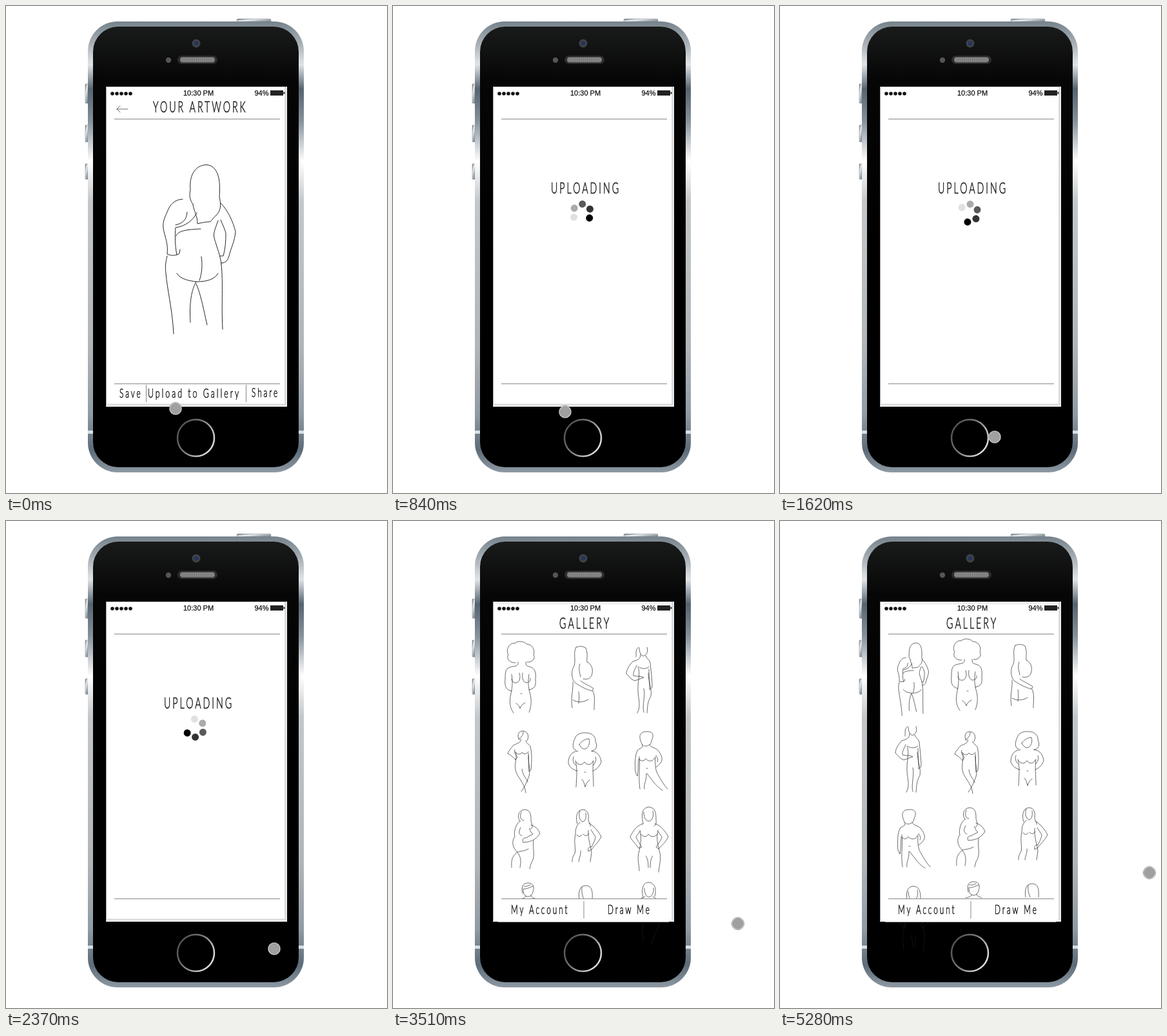
Recreate the animation shown at these times as an HTML page. Size 591x756 px, loop 6060 ms.

```html
<!DOCTYPE html>
<html lang="en">
<head>
<meta charset="utf-8">
<title>Gallery upload</title>
<style>
html, body { margin: 0; width: 100%; height: 100%; overflow: hidden; background: #fff; }
svg { display: block; width: 591px; height: 756px; }
.line { fill: none; stroke: #1c1c1c; stroke-width: .65; stroke-linecap: round; }
.line path { vector-effect: non-scaling-stroke; }
#portrait { stroke-width: .95; }
.rule { stroke: #888; }
.status { font: 11px "Liberation Sans", Arial, sans-serif; fill: #111; stroke: #111; stroke-width: .25; }
.label { font: 300 19px Lato, "Open Sans", sans-serif; letter-spacing: 4.8px; fill: #111; stroke: #111; stroke-width: .55; }
.title { font-size: 23px; }
.wide { font-size: 20px; }
</style>
</head>
<body>
<svg viewBox="0 0 591 756">
  <defs>
    <linearGradient id="steel" x2="0" y2="1">
      <stop offset="0" stop-color="#75828b"/>
      <stop offset=".05" stop-color="#a9b1b7"/>
      <stop offset=".095" stop-color="#e2e5e8"/>
      <stop offset=".15" stop-color="#566470"/>
      <stop offset=".22" stop-color="#84909a"/>
      <stop offset=".31" stop-color="#fff"/>
      <stop offset=".4" stop-color="#c3c7ca"/>
      <stop offset=".72" stop-color="#b0b5b9"/>
      <stop offset=".87" stop-color="#919ba3"/>
      <stop offset=".95" stop-color="#5d6c79"/>
      <stop offset="1" stop-color="#8d99a3"/>
    </linearGradient>
    <linearGradient id="glass" x2="0" y2="1">
      <stop offset="0" stop-color="#191b1a"/>
      <stop offset=".12" stop-color="#060606"/>
      <stop offset=".5" stop-color="#000"/>
    </linearGradient>
    <linearGradient id="key" y2="1">
      <stop offset="0" stop-color="#5d6a74"/>
      <stop offset=".3" stop-color="#eef0f1"/>
      <stop offset=".6" stop-color="#9aa4ab"/>
      <stop offset="1" stop-color="#56636d"/>
    </linearGradient>
    <linearGradient id="ring" x2="1" y2=".6">
      <stop offset="0" stop-color="#444"/>
      <stop offset=".5" stop-color="#777"/>
      <stop offset="1" stop-color="#ddd"/>
    </linearGradient>
    <pattern id="mesh" width="3" height="3" patternUnits="userSpaceOnUse">
      <path d="M0 0h3v3h-3z" fill="#8b8b8b"/><circle cx="1.5" cy="1.5" r=".8" fill="#5a5a5a"/>
    </pattern>
  </defs>

  <g fill="url(#key)" stroke="#6d7982" stroke-width=".5">
    <rect x="358" y="20" width="53" height="7" rx="2"/>
    <rect x="123" y="121" width="6" height="30" rx="1"/>
    <rect x="123" y="185" width="6" height="26" rx="1"/>
    <rect x="123" y="245" width="6" height="24" rx="1"/>
  </g>
  <rect x="127" y="24" width="335" height="700" rx="46" fill="url(#steel)"/>
  <path d="M127 84h8v5h-8zM454 84h8v5h-8zM127 659h8v5h-8zM454 659h8v5h-8z" fill="#d9dee1"/>
  <rect x="135" y="32" width="319" height="684" rx="39" fill="url(#glass)"/>
  <circle cx="295" cy="58" r="6.5" fill="#414345"/>
  <circle cx="295" cy="58" r="3.5" fill="#26345c"/>
  <circle cx="252" cy="84" r="4.2" fill="#555"/>
  <rect x="266" y="77" width="62" height="13" rx="6.5" fill="#2c2c2c"/>
  <rect x="270" y="79.5" width="54" height="8" rx="4" fill="url(#mesh)"/>
  <circle cx="294.5" cy="670.5" r="28.5" fill="#000" stroke="url(#ring)" stroke-width="2.5"/>

  <rect x="155" y="125" width="281" height="497" fill="#fff"/>
  <path d="M156 125.5H435M155.5 125V621" stroke="#aaa" fill="none"/>
  <path d="M433.5 126V619H157" stroke="#dcdcdc" stroke-width="3" fill="none"/>

  <g id="art">
    <path d="M189 160H172m5-5l-5 5 5 5" class="line"/>
    <g id="portrait" class="line"></g>
    <path class="rule" d="M217.5 588V615M372.5 588V615"/>
  </g>
  <g id="load"><g id="spin"></g></g>
  <g id="gallery">
    <path d="M160 128.5H432" stroke="#ddd"/>
    <g id="before" class="line"></g>
    <g id="after" class="line"></g>
    <path d="M157 587H432V622H157z" fill="#fff"/>
    <path class="rule" d="M296 590V617"/>
    <path d="M163 622.5H428" stroke="#999"/>
  </g>
  <path class="rule" d="M168 175.5H425M168 586.5H425"/>
  <g id="dots" fill="#111"></g>
  <text class="status" x="275" y="139">10:30 PM</text>
  <text class="status" x="385.5" y="139">94%</text>
  <path d="M410 131h20v8h-20zM430.500 133.500h2v3h-2z" fill="#222"/>

  <g id="cursor">
    <circle r="9.600" fill="#fff" stroke="#777" stroke-width=".8"/>
    <circle r="8.200" fill="#a0a0a0" stroke="#777" stroke-width=".6"/>
  </g>
</svg>
<script>
const $ = id => document.getElementById(id);
const add = (parent, html) => parent.insertAdjacentHTML('beforeend', html);

// Each sketch: first-layout path, then its shift to the second layout.
const sketches = [
  ['M190 220C181 221 175 213 179 207C174 200 181 188 189 190C194 185 204 187 207 191C216 191 221 201 218 207C222 214 215 220 208 219M194 219C195 224 192 225 185 226C175 228 174 232 174 245C173 255 174 262 184 264M206 219C206 224 207 225 211 226C221 228 222 236 221 246C222 256 220 260 211 262M184 238C186 250 185 258 183 268C180 280 181 290 187 298M211 238C209 250 210 258 212 266C216 278 214 290 211 297M196 236c2 6 1 13-4 15c-5 1-8-2-8-6M201 236c-1 6 0 13 5 15c5 0 8-3 7-7M191 283c3 2 5 4 6 8c1-4 4-7 8-9M198 268h2', 92, -4],
  ['M284 196C279 205 284 215 281 225C274 236 279 250 284 252C292 258 302 262 309 264L311 260C304 255 295 252 291 248M284 196C289 194 294 194 299 197C303 207 300 213 301 219C309 222 311 232 308 240C305 246 300 246 295 245M279 250C280 262 275 275 278 290M310 264C314 272 312 282 312 293M279 278C286 282 295 282 303 277M288 265c1 6 1 12 0 18M290 222c-3 8 0 14 1 20', 81, -3],
  ['M381 196C375 200 378 206 377 211M382 197C382 206 386 211 390 209C394 207 396 202 394 196M384 207C384 214 380 216 372 218C366 224 362 232 362 237C366 242 370 246 375 248L389 243C384 240 378 242 373 240C372 234 377 228 378 224M392 209C393 214 398 215 399 220C400 232 402 245 402 258L398 262C398 250 397 240 397 230M380 226C384 236 380 248 380 258C379 275 386 285 379 298M396 236C396 250 402 260 400 272C394 282 395 290 394 298M389 260C392 272 386 285 389 297M382 227c4 3 12 3 15-1', -183, 123],
  ['M196 340C192 334 194 326 201 326C209 326 212 334 208 341M202 327c0 6-3 9-7 11M198 338C200 344 193 345 187 348C181 355 179 358 178 361C184 364 188 368 190 371L193 366C190 362 187 359 189 355M206 341C206 345 211 346 213 350C216 362 215 375 214 386L211 389C210 380 211 368 210 360M190 358C193 366 188 378 190 386C192 398 204 405 206 422M210 364C209 375 214 385 211 396C207 406 204 414 199 420M190 359c3 4 8 4 10 0c3 4 8 3 10-1M200 385C201 396 208 400 209 405', 93, 1],
  ['M284 356C276 354 280 342 282 338C284 330 294 328 299 329C309 328 315 336 314 342C318 350 315 356 308 357M289 347C292 352 294 354 298 354C304 352 306 344 304 338C298 338 292 342 289 347M287 357C276 358 272 366 272 376C275 384 280 386 286 388M308 357C318 358 322 366 323 374C320 382 315 386 310 388M283 372C286 384 285 395 284 413M311 372C309 384 311 396 311 412M284 374c4 6 10 5 13 0c4 6 11 5 13-1M293 401c3 3 4 7 5 12c1-4 3-8 7-11M297 390h2M280 366c-2 5 0 10 3 13M314 366c2 5 0 9-3 13', 86, -2],
  ['M387 348C380 335 382 327 393 327C404 326 405 333 401 341C400 349 394 350 389 349M387 347C388 352 384 353 380 355C375 362 375 378 376 390L379 396C381 385 380 376 381 370M398 347C400 352 408 352 411 356C416 362 418 368 417 372C414 378 411 380 408 382M408 364c2 4 4 6 2 10M382 366C384 380 380 395 383 416M407 366C406 380 408 388 410 392C416 402 420 410 426 416M393 392C394 402 388 410 390 416M394 392C402 402 408 412 418 418M381 369c4 5 9 4 11 0c4 5 11 5 14-1M393 384h2', -193, 121],
  ['M197 466C192 460 194 449 204 448C214 448 214 458 214 464C214 470 219 474 214 478M199 452C196 460 198 464 203 465M197 466C190 470 187 484 189 490C183 498 186 508 193 514C182 522 184 532 184 538M214 472C222 474 226 480 228 485C222 494 216 498 202 499C200 495 202 491 206 492L217 486C214 484 212 480 212 477M218 496C216 510 222 520 214 532L212 540M193 514C200 512 206 512 210 509M198 476c-3 6-4 10 2 13M193 515C200 522 198 532 197 538', 90, -3],
  ['M286 470C283 462 284 449 294 448C303 448 304 458 303 463C303 468 307 470 306 474M290 450c-3 8 0 15 4 17c5-1 6-8 5-14M290 468C284 472 283 480 283 486C280 500 284 508 282 516C278 522 278 526 278 529M304 469C313 474 320 484 323 490C318 500 312 504 308 510L303 513C302 508 304 505 308 506C311 500 314 494 314 490C311 486 309 482 307 479M303 480C302 492 306 502 308 515L306 529M291 512C292 518 288 524 288 529M285 487c3 4 6 3 8 0M295 486c3 4 7 3 9-1', 92, -3],
  ['M388 470C386 460 384 446 396 444C408 444 408 456 408 464C409 470 407 472 405 474M389 452c0 10 4 14 8 14c6-1 8-10 6-16M388 470C378 472 372 482 368 490C370 496 376 500 381 508L386 506C382 500 378 494 377 490L383 482M406 470C416 472 422 482 427 490C424 498 418 502 412 509L408 506C412 500 417 494 417 490L411 482M383 480C386 492 384 500 382 512C378 524 382 534 382 543M411 480C408 494 411 502 413 512C417 522 413 534 412 545M384 486c4 5 10 5 12 0c4 5 11 5 14 0M392 520c3 3 4 10 4 18M403 520c-3 3-4 10-4 18', -190, 123],
  ['M201 578C198 565 203 562 210 562C219 562 219 570 217 576C215 582 212 583 209 583C204 583 202 578 202 572M202 571c5 1 9-2 15-4M203 567c4 1 7-1 10-2M206 582c0 3-4 4-9 5M214 581c0 4 4 4 8 6', 91, -2],
  ['M289 587C287 575 290 566 299 566C309 566 310 576 309 587M293 568c-1 8 1 14 3 19', 92, -3],
  ['M388 585C384 570 389 561 396 561C404 561 410 568 406 583M390 570c0 9 3 13 7 14c5-1 8-8 7-14M391 583l-8 4M403 583l6 4M388 626C384 642 390 646 388 652M415 625C408 634 406 645 400 657']
];
const portrait = 'M290 308C285 300 284 295 286 285C284 265 292 247 311 246.500C330 248 333 272 331 296C334 310 333 318 326 325C320 330 319 334 316 335C308 335 302 337 297 338C297 325 291 318 290 308M274 300C262 300 254 308 250 320C245 330 243 337 244 345C246 358 252 368 250 385C256 388 264 388 269 384L270 378M296 321C290 333 278 342 263 344C262 356 262 372 265 386M264 357C266 349 280 347 302 346M263 340C275 337 280 332 281 320M333 306C345 318 352 335 356 350C355 365 349 375 346 388C343 398 338 399 334 399M329 333C325 345 321 352 323 360C327 375 333 388 334 402M333 332C336 340 340 347 341 353C341 366 340 378 337 388L332 388M250 388C247 400 247 405 248 415C250 440 258 470 260 509M334 402C337 430 334 460 336 502M265 415C270 424 285 427 296 428C312 428 324 424 329 415M303 389C305 402 304 415 300 426M295 428C288 440 284 460 286 491M295 431C303 450 306 470 312 495';

const path = (d, move = '') => `<path d="${d}" transform="${move}"/>`;
add($('portrait'), path(portrait));
for (const [d, dx, dy] of sketches) {
  add($('before'), path(d));
  if (dx) add($('after'), path(d, `translate(${dx} ${dy})`));
}
const upload = 'translate(77.500 83.200) scale(.43)';
add($('gallery'), `<g id="added" class="line">${path(portrait, upload)}</g>`);

// One condensed style serves every label.
const label = (group, text, x, y, kind = '') =>
  add($(group), `<text class="label ${kind}" transform="translate(${x} ${y}) scale(.62 1)">${text}</text>`);
label('art', 'YOUR ARTWORK', 228, 165, 'title');
label('art', 'Save', 176, 608);
label('art', 'Upload to Gallery', 220, 608, 'wide');
label('art', 'Share', 381, 607);
label('load', 'UPLOADING', 245, 291, 'title');
label('gallery', 'GALLERY', 258, 167, 'title');
label('gallery', 'My Account', 183, 610);
label('gallery', 'Draw Me', 333, 610);

for (let i = 0; i < 5; i++) add($('dots'), `<circle cx="${165 + i * 7}" cy="136" r="2.800"/>`);
['#000', '#333', '#5a5a5a', '#aaa', '#e0e0e0'].forEach((color, i) =>
  add($('spin'), `<circle cx="14" r="5.500" fill="${color}" transform="rotate(${-60 * i})"/>`));

// Cursor path: time, x, y
const stops = [
  [0, 263, 625], [630, 263, 625], [840, 267, 630], [1050, 278, 645], [1260, 295, 662],
  [1620, 333, 669], [1890, 363, 670], [2370, 416, 664], [2520, 432, 661], [3150, 499, 643],
  [3510, 535, 625], [3780, 559, 606], [3990, 573, 589], [4140, 577, 572],
  [4260, 576, 557], [4380, 573, 546], [6060, 573, 546]
];
const ramp = (t, from, to) => Math.min(1, Math.max(0, (t - from) / (to - from)));
const fade = (id, value) => $(id).setAttribute('opacity', value);

function draw(now) {
  const t = Math.floor(now % 6060 / 30) * 30;
  const i = stops.findIndex(s => s[0] > t);
  const [a, b] = [stops[i - 1], stops[i]];
  const k = ramp(t, a[0], b[0]);
  $('cursor').setAttribute('transform', `translate(${a[1] + (b[1] - a[1]) * k} ${a[2] + (b[2] - a[2]) * k})`);
  $('spin').setAttribute('transform', `translate(293 321.500) rotate(${33 + (t - 840) * 360 / 660})`);

  const opened = ramp(t, 2850, 3300);
  fade('art', 1 - ramp(t, 0, 450));
  fade('load', ramp(t, 0, 450) * (1 - opened));
  fade('gallery', opened);
  fade('before', 1 - ramp(t, 3780, 3990));
  fade('after', ramp(t, 4020, 4380));
  fade('added', ramp(t, 4740, 5280));
  requestAnimationFrame(draw);
}
requestAnimationFrame(draw);
</script>
</body>
</html>
```
